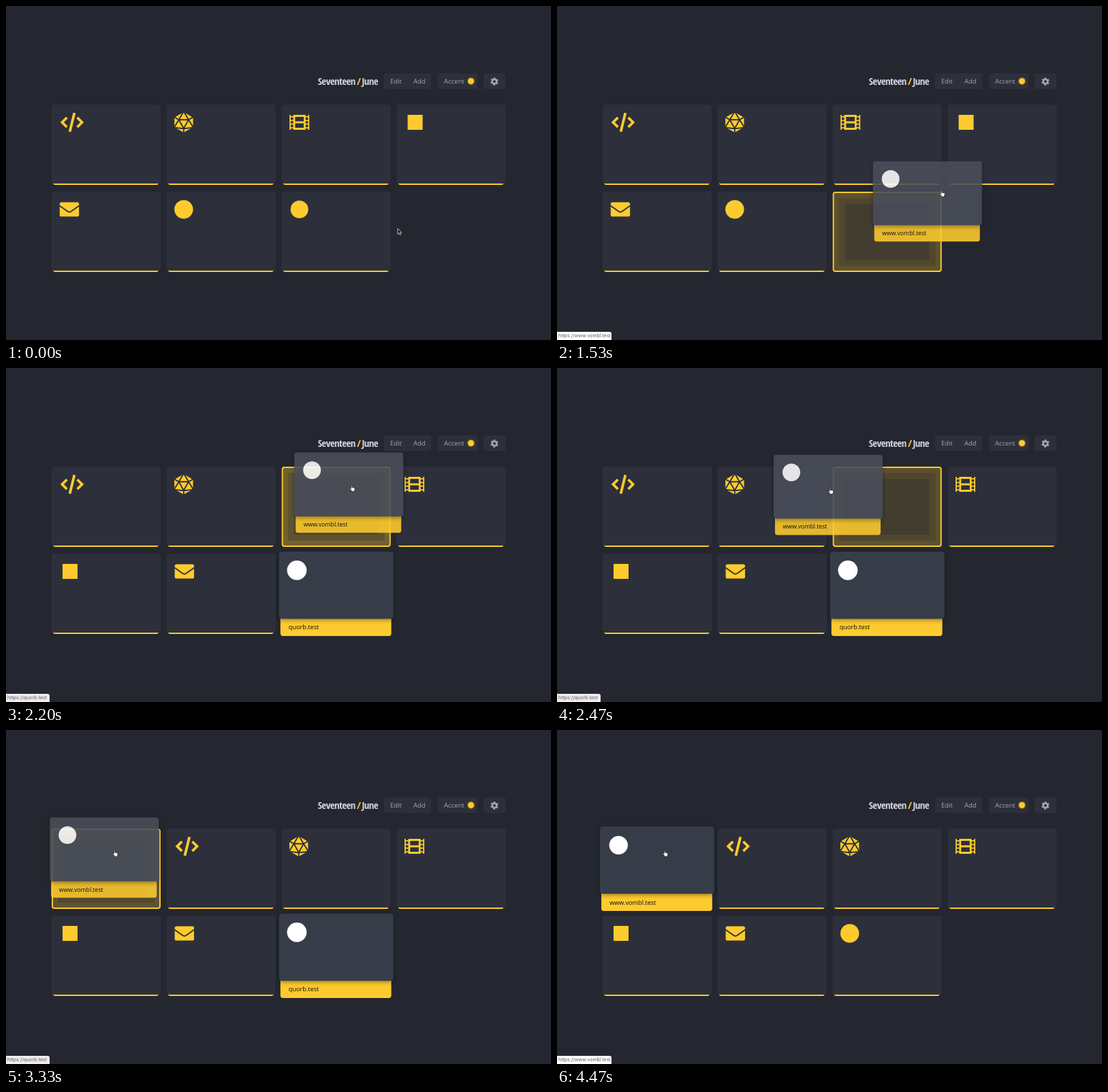
These frames come from a looping animation (800 px wide and 491 px high, 4540 ms). An HTML page:

```html
<!DOCTYPE html>
<html lang="en">
<head>
<meta charset="utf-8">
<title>Start page</title>
<style>
  :root { --accent: #fecb2e; --card: #2d303b; --soft: #a1a7b7; }
  html, body { margin: 0; width: 100%; height: 100%; overflow: hidden; background: #252730; }
  #stage { position: relative; width: 800px; height: 491px; overflow: hidden; font-family: "Open Sans", sans-serif; }
  #stage > * { position: absolute; }
  svg { display: block; overflow: visible; }

  h1 { right: 254px; top: 99px; margin: 0; white-space: nowrap; color: #d0d5df;
       font: 600 17.5px/23px "Open Sans Condensed", "Open Sans", "Roboto Condensed", sans-serif;
       font-stretch: 75%; letter-spacing: -.6px; word-spacing: -1px; }
  h1 b { color: var(--accent); }
  .panel { top: 99px; height: 23px; border-radius: 3px; background: var(--card); }
  .panel span { position: absolute; font-size: 9.5px; line-height: 23px; color: var(--soft); }
  .dot { position: absolute; left: 44px; top: 7px; width: 9px; height: 9px; border-radius: 50%;
         background: var(--accent); box-shadow: 0 0 0 1.5px #5b4e2d; }

  .card, #ghost { left: 0; top: 0; width: 159.6px; height: 118px; box-sizing: border-box; }
  .card > * { position: absolute; box-sizing: border-box; }
  .bar { left: 2.4px; right: 2.4px; bottom: 0; overflow: hidden; border-radius: 0 0 3.5px 3.5px; background: var(--accent); }
  .bar span { position: absolute; left: 11.1px; bottom: -1px; font-size: 8.7px; color: #0c0d10; white-space: nowrap; }
  .face { left: 0; top: 0; width: 100%; border-radius: 4px; background: var(--face); }
  .face svg { position: absolute; top: 25.7px; fill: currentColor; stroke: none; }
  .cut { fill: none; stroke: var(--face); stroke-width: 1.9; }

  #ghost { border: 2.3px solid var(--accent); border-radius: 4px; }
  #ghost i { position: absolute; inset: 0; background: rgba(254, 203, 46, .18);
             box-shadow: inset 0 0 0 7px rgba(254, 203, 46, .12), inset 0 0 0 16px rgba(254, 203, 46, .1); }

  #status { left: 0; bottom: 0; height: 12px; border-radius: 0 3px 0 0; background: #fff; color: #5c5c63;
            font: 7px/12px Inter, Roboto, sans-serif; padding-left: 2px; box-sizing: border-box; white-space: nowrap; }
</style>
</head>
<body>
<div id="stage">
  <h1>Seventeen <b>/</b> June</h1>
  <div class="panel" style="left:555px;width:69px">
    <span style="left:9px">Edit</span><span style="left:43px">Add</span>
  </div>
  <div class="panel" style="left:634px;width:58px">
    <span style="left:9px">Accent</span><div class="dot"></div>
  </div>
  <div class="panel" style="left:701px;width:32px">
    <svg width="32" height="23" fill="none" stroke="#a1a7b7">
      <g transform="translate(16 12) rotate(-106)">
        <circle r="3.2" stroke-width="2.6"/>
        <circle r="5" stroke-width="1.7" stroke-dasharray="2.8 2.436"/>
      </g>
    </svg>
  </div>
  <div id="ghost"><i></i></div>
  <div id="status"></div>
  <svg id="cursor" width="1" height="1" stroke-linejoin="round">
    <path id="arrow" fill="#111" stroke="#e8e8ec" stroke-width=".8" d="M-2-5V3.4L0 1.6 1.3 4.6 2.6 4 1.4 1.2H3.8Z"/>
    <path id="hand" fill="#fff" stroke="#15161b" stroke-width=".7"
      d="M-1.9-4.2Q-1.2-5-.5-4.2V-1.6L2.9-.8Q3.8-.4 3.7.6L3 3V4.5H-1.3V3.4L-3.8.4Q-3.6-.6-2.6-.2L-1.9.5Z"/>
  </svg>
</div>

<script>
const LOOP = 4540, STEP = 200 / 3;
const DRAG = 1050, DROP = 3600, OFFSET = [98, 53], LAG = 35;
const SITES = { circleA: 'quorb.test', circleB: 'www.vombl.test' };

const slots = Array.from({ length: 7 }, (_, i) => [67 + 168.85 * (i % 4), 145 + 128 * Math.floor(i / 4)]);

// Time at which the gap moves, and the slot it moves to
const gapSteps = [[0, 6], [1700, 3], [2030, 2], [2481, 1], [2930, 0]];

const path = [
  [0, 577, 332], [70, 577, 332], [300, 535, 328], [460, 500, 325], [1050, 500, 325],
  [1250, 522, 312], [1500, 562, 281], [1700, 584, 250], [1800, 591, 219], [1867, 591, 218],
  [1930, 588, 208], [2080, 552, 178], [2200, 508.5, 177], [2800, 269, 186],
  [3100, 172, 182], [3333, 160.5, 181.5], [4540, 159, 181.5]
];

const film = () => {
  const box = (x, y, w, h) => `M${x} ${y}h${w}v${h}h${-w}z`;
  let d = box(-14.5, -10.9, 29, 21.8) + box(-6.3, -8.1, 12.6, 6.7) + box(-6.3, 1.4, 12.6, 6.7);
  for (const x of [-12.7, 9.1]) {
    d += box(x, -10.9, 3.6, 1.8) + box(x, 9.1, 3.6, 1.8);
    for (let i = -1; i < 2; i++) d += box(x, i * 5.4 - 1.8, 3.6, 3.6);
  }
  return `<path fill-rule="evenodd" d="${d}"/>`;
};

// Each tile: name, horizontal centre of its icon, drawing
const tiles = [
  ['code', 29.5, `<path fill="none" stroke="currentColor" stroke-width="3.8"
    d="M-7.6-7-14.6 0-7.6 7M7.6-7 14.6 0 7.6 7M3.4-13.8-3.4 13.8"/>`],
  ['die', 25, `<path d="M0-15 13.7-7V7L0 15-13.7 7V-7Z"/>
    <path class="cut" d="M-7.2-3.8H7.2L0 8.9ZM0-16-7.2-3.8-15-8.4M0-16 7.2-3.8 15-8.4M-7.2-3.8-15 8.9M7.2-3.8 15 8.9M-15 7.6 0 9.2 15 7.6M0 9V16"/>`],
  ['film', 26, film()],
  ['square', 27.4, '<rect x="-11" y="-11" width="22" height="22"/>'],
  ['mail', 26, `<rect x="-14.2" y="-10.6" width="28.4" height="21.2" rx="2.7"/>
    <path class="cut" d="M-14.5-5.5-2.5 3Q0 4.6 2.5 3L14.5-5.5"/>`],
  ['circleA', 25, '<circle r="13.7"/>'],
  ['circleB', 26, '<circle r="13"/>']
];

const $ = id => document.getElementById(id);
const stage = $('stage'), ghost = $('ghost'), status = $('status'), cursor = $('cursor');

const cards = tiles.map(([name, x, icon]) => {
  const el = document.createElement('div');
  el.className = 'card';
  el.innerHTML = `<div class="bar"><span>${SITES[name] || ''}</span></div>
    <div class="face"><svg width="1" height="1" style="left:${x}px">${icon}</svg></div>`;
  stage.insertBefore(el, status);
  return { el, bar: el.children[0], label: el.querySelector('span'), face: el.children[1] };
});

// Keep the heading inside its place whichever condensed face is available
const title = document.querySelector('h1');
title.style.fontSize = 17.5 * Math.min(1, 90 / title.getBoundingClientRect().width) + 'px';

const ramp = (t, start, length = 250) => {
  const x = Math.min(1, Math.max(0, (t - start) / length));
  return x * x * (3 - 2 * x);
};
const mix = (a, b, k) => `rgb(${a.map((v, i) => Math.round(v + (b[i] - v) * k))})`;

function cursorAt(t) {
  const i = Math.max(1, path.findIndex(p => p[0] >= t));
  const [t0, x0, y0] = path[i - 1], [t1, x1, y1] = path[i];
  const k = (t - t0) / (t1 - t0);
  return [x0 + (x1 - x0) * k, y0 + (y1 - y0) * k];
}

function place(card, [x, y], hover, scale, lifted) {
  const open = 2.2 + 21.4 * hover;
  const { el, bar, label, face } = card;
  el.style.transform = `translate(${x}px,${y}px) scale(${scale})`;
  el.style.opacity = lifted ? .88 : 1;
  el.style.setProperty('--face', lifted ? 'rgb(73,78,90)' : mix([45, 48, 59], [55, 61, 72], hover));
  face.style.height = 118 - open + 'px';
  face.style.color = mix([254, 203, 46], [255, 255, 255], hover);
  face.style.boxShadow = `0 2px 6px rgba(0,0,0,${.38 * hover})`;
  bar.style.height = open + 3 + 'px';
  label.style.lineHeight = open + 'px';
  label.style.opacity = Math.min(1, hover * 5);
}

function render(t) {
  const [since, gap] = gapSteps.filter(s => s[0] <= t).pop();
  const dragging = t >= DRAG && t < DROP;
  const [cx, cy] = cursorAt(t);

  const hoverA = ramp(t, 1780) - ramp(t, 3620);
  cards.slice(0, 6).forEach((card, i) => {
    const hover = i === 5 ? hoverA : 0;
    place(card, slots[i < gap ? i : i + 1], hover, 1 + .05 * hover, false);
  });

  if (dragging) {
    const [x, y] = cursorAt(t - LAG);
    place(cards[6], [x - OFFSET[0], y - OFFSET[1]], 1, 1, true);
  } else {
    const hover = ramp(t, t < DRAG ? 260 : 3620);
    const press = t < DRAG ? .03 * ramp(t, 890, 120) : 0;
    place(cards[6], slots[gap], hover, 1 + .05 * hover - press, false);
  }

  ghost.style.display = dragging ? '' : 'none';
  ghost.style.transform = `translate(${slots[gap][0]}px,${slots[gap][1]}px)`;
  ghost.firstChild.style.opacity = 1 - .25 * ramp(t, Math.max(since, DRAG) + 330, 90);

  const overA = t >= 1780 && t < 3620;
  status.style.display = t < 640 ? 'none' : '';
  status.style.width = overA ? '63.5px' : '79.7px';
  status.style.background = overA ? '#f0ebef' : '#fff';
  status.textContent = 'https://' + (overA ? SITES.circleA : SITES.circleB);

  cursor.style.transform = `translate(${cx}px,${cy}px)`;
  const outside = t < DRAG && cx > 565;
  $('arrow').style.display = outside ? '' : 'none';
  $('hand').style.display = outside ? 'none' : '';
}

const start = performance.now();
function tick() {
  const t = (performance.now() - start) % LOOP;
  render(Math.min(67, Math.floor((t + 5) / STEP)) * STEP);
  requestAnimationFrame(tick);
}
tick();
</script>
</body>
</html>
```
